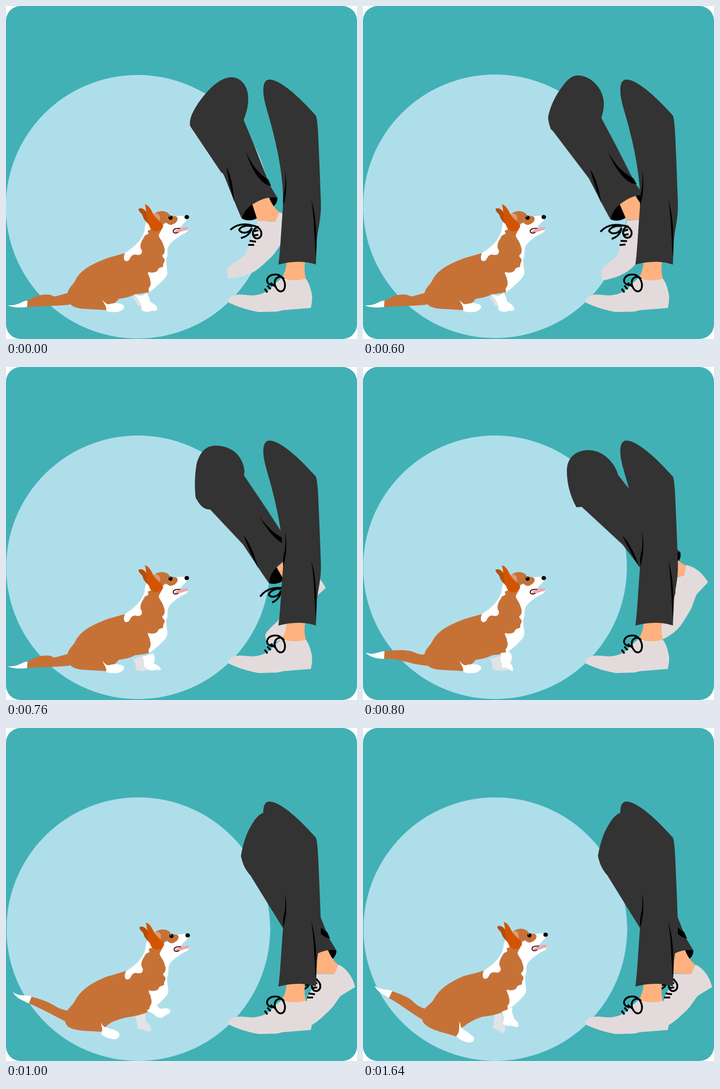
Write an HTML page that moves like this. It is 768 px wide and 729 px high and loops after 2 s.

```html
<!DOCTYPE html>
<html lang="en">
<head>
<meta charset="utf-8">
<title>Dog and walker</title>
<style>
html, body { margin: 0; width: 100%; height: 100%; overflow: hidden; background: #fff; }
svg { display: block; width: 768px; height: 729px; }
.brown { fill: #c67237; }
.white { fill: #fff; }
.grey { fill: #e3e3e5; }
.pants { fill: #333; }
.skin { fill: #ffb27f; }
.shoe { fill: #e3dbdb; }
.lace { fill: none; stroke: #000; stroke-width: 4; }

/* every pose is held, then cut to the next */
.disc, .shin, .thigh, .tail, .tip, .torso, .front, .far, .near, .hind {
  animation: 2s step-end infinite;
}
.disc { animation-name: disc; }
.shin { animation-name: shin; transform-origin: 594px 420px; }
.thigh { animation-name: thigh; }
.tail { animation-name: tail; }
.tip { animation-name: tip; }
.torso { animation-name: torso; }
.front { animation-name: front; }
.far { animation-name: far; }
.near { animation-name: near; }
.hind { animation-name: hind; }

@keyframes disc {
  0% { transform: translate(0, 0); }
  30% { transform: translate(.8px, -1px); }
  45%, 100% { transform: translate(1.5px, .8px); }
}
@keyframes shin {
  0% { transform: translate(0, 0) rotate(0deg); }
  30% { transform: translate(21.2px, -5.3px) rotate(-5.5deg); }
  35% { transform: translate(49.2px, -6.6px) rotate(-11.5deg); }
  40% { transform: translate(100px, -15px) rotate(-15.5deg); }
  45% { transform: translate(112px, 43px) rotate(-6.5deg); }
  50%, 100% { transform: translate(129px, 67px) rotate(0deg); }
}
@keyframes thigh {
  0% { d: path("M403 263C400 248 408 232 421 212C441 184 467 156 494 156C518 157 530 180 530 203C530 220 526 233 521 247L472 366Z"); }
  30% { d: path("M411 270C408 261 405 252 405 243C410 217 423 193 437 175C449 159 458 152 471 152C502 153 527 184 527 214C527 227 524 237 521 247L470 300Z"); }
  35% { d: path("M415 286C412 264 413 236 417 212C424 186 438 172 459 172C494 173 518 193 522 229L510 300L444 312C432 311 424 303 415 286Z"); }
  40% { d: path("M467 307C454 284 446 256 446 227C446 199 465 182 494 182C525 183 549 207 558 235L560 300Z"); }
  45% { d: path("M476 295C474 268 477 238 485 217C494 195 504 185 521 184C538 184 552 190 565 200L620 300L500 327C490 320 482 307 476 295Z"); }
  50%, 100% { d: path("M514 280C519 252 526 230 538 211C546 197 554 189 564 185L640 250L600 330L537 325C525 313 518 299 514 280Z"); }
}
@keyframes tail {
  0% { d: path("M136 628C123 631 114 635 104 636C98 630 83 632 74 633C62 636 54 642 46 646L45 659C75 657 108 657 138 654L160 640Z"); }
  40% { d: path("M137 629C121 632 112 622 98 621C80 618 62 621 46 622L46 639C78 637 103 651 140 654L160 640Z"); }
  45% { d: path("M136 625C125 623 114 615 105 609C88 600 70 597 55 591L49 606C78 618 108 630 138 648L160 630Z"); }
  50% { d: path("M135 619C125 617 116 614 108 609C92 599 72 592 55 588L49 602C78 615 106 630 131 643L155 630Z"); }
  55%, 100% { d: path("M136 615C126 611 119 608 113 602C100 588 82 583 63 576L56 591C83 605 106 625 131 639L155 630Z"); }
}
@keyframes tip {
  0% { d: path("M47 645C34 645 29 657 4 655C12 660 30 661 46 659Z"); }
  40% { d: path("M47 622C33 623 25 632 5 625C15 635 30 639 46 639Z"); }
  45% { d: path("M56 591C42 587 31 595 15 583C22 595 35 600 49 607Z"); }
  50% { d: path("M56 588C42 583 31 589 15 578C21 591 36 596 50 603Z"); }
  55%, 100% { d: path("M64 576C51 570 40 575 25 564C31 578 44 582 57 591Z"); }
}
@keyframes torso {
  0% { d: path("M300 510C290 528 275 536 260 541C240 547 225 550 214 555C183 567 162 580 152 600C148 609 139 615 136 624C131 636 134 652 150 659C165 665 190 663 219 666L228 653C240 651 242 646 247 641C260 639 272 637 282 631C295 630 305 628 314 626L320 612L344 572L340 520Z"); }
  45% { d: path("M302 506C292 524 276 532 262 537C240 544 227 546 216 550C183 562 164 576 152 598C147 608 138 614 135 624C132 636 138 653 152 659C165 664 190 663 218 664L228 652C238 648 240 642 246 638C262 634 285 632 300 626L316 620L322 606L346 568L342 516Z"); }
  50% { d: path("M302 502C292 520 276 528 262 532C240 539 227 542 216 546C183 560 164 574 151 597C146 607 137 612 133 621C127 634 127 646 136 654C150 664 180 663 208 665L218 655C225 645 240 640 254 636C270 632 290 630 305 624L318 617L324 602L346 564L342 512Z"); }
  55%, 100% { d: path("M304 500C294 519 278 526 264 531C244 538 229 540 218 544C188 557 168 571 156 592C150 604 138 609 133 617C128 630 127 641 135 648C148 662 180 667 206 676L214 658C225 650 240 638 262 632C280 630 295 627 308 620L320 614L326 600L348 562L344 510Z"); }
}
@keyframes front {
  0% { transform: translate(0, 0); }
  45% { transform: translate(1.8px, -4px); }
  50% { transform: translate(2px, -8px); }
  55%, 100% { transform: translate(4px, -9.5px); }
}
@keyframes far {
  0% { d: path("M277 638L285 632L297 656L289 657C287 650 283 644 277 638Z"); }
  35% { d: path("M277 640L302 631L304 655L312 662C304 667 291 666 285 662C282 658 287 651 277 640Z"); }
  40% { d: path("M278 639L301 632L302 655L319 661C316 666 298 665 287 663C280 660 287 651 278 639Z"); }
  45% { d: path("M281 632L302 627C303 636 303 644 306 647C314 647 321 654 321 660C315 664 302 660 298 662C290 662 287 658 289 654C288 646 285 640 281 632Z"); }
  50% { d: path("M283 630L304 624C306 632 306 638 307 644C314 647 318 655 318 662C312 667 306 663 298 660C290 660 286 657 288 652C286 644 285 638 283 630Z"); }
  55%, 100% { d: path("M287 628L303 625C307 633 305 642 309 648C312 655 312 662 308 668C302 668 299 661 291 659C284 658 281 655 285 651C287 644 288 638 287 628Z"); }
}
@keyframes near {
  0% { d: path("M281 631C293 636 301 635 308 627L314 640C312 649 326 651 330 659C333 666 328 669 319 667C312 671 299 670 296 664C298 652 289 641 281 631Z"); }
  35% { d: path("M299 634L322 627C326 634 327 641 323 648C328 653 338 654 339 663C334 665 329 661 325 664C317 665 310 664 305 658C300 654 303 643 299 634Z"); }
  40% { d: path("M301 626L321 624C327 631 327 639 322 648C326 652 329 657 328 665C321 666 318 659 313 658C307 660 301 657 304 651C299 643 303 635 301 626Z"); }
  45% { d: path("M313 622L330 605C334 614 339 622 346 624C354 627 356 631 354 637C347 638 343 636 339 640C332 643 325 640 320 634Z"); }
  50% { d: path("M308 619L329 602C331 610 334 614 341 615C350 612 358 614 360 620C357 628 348 627 344 633C338 636 331 634 326 629C321 623 314 622 308 619Z"); }
  55%, 100% { d: path("M304 621L327 612C324 624 329 629 332 638C340 644 342 650 339 655C332 655 326 651 321 652C315 652 307 651 306 645C310 636 307 629 304 621Z"); }
}
@keyframes hind {
  0% { d: path("M211 643C216 650 222 655 228 652C240 650 253 650 258 656C260 664 250 670 240 670C228 671 221 669 219 666C221 658 214 652 211 643Z"); }
  50% { d: path("M208 645C213 657 222 655 230 659C240 661 250 666 248 674C243 684 232 682 222 678C213 674 207 672 209 666C213 660 208 653 208 645Z"); }
  55%, 100% { d: path("M211 643C214 648 213 655 217 658C225 664 233 667 242 677C246 686 238 690 228 688C216 685 207 679 204 674C212 668 210 655 211 643Z"); }
}
</style>
</head>
<body>
<svg viewBox="0 0 768 729">
  <rect width="768" height="729" rx="32" fill="#41b1b6"/>
  <circle class="disc" cx="288" cy="439.5" r="288.5" fill="#afdeeb"/>

  <g id="dog">
    <path class="tail brown"/>
    <path class="tip white"/>
    <path class="far grey"/>
    <path class="torso brown"/>
    <path class="hind white"/>
    <path class="near white"/>
    <g class="front">
      <path class="brown" d="M312 478C308 500 300 510 290 530L300 570L330 584L346 570L350 540L338 505L344 482Z"/>
      <path class="white" d="M310 468C306 475 304 480 303 492C296 515 280 528 260 541C255 555 260 560 266 558C273 556 270 546 282 544C292 547 299 544 297 534C291 526 296 518 300 506C304 500 306 503 312 498L310 492L317 489L318 475Z"/>
      <path class="white" d="M374 460L391 459C399 461 398 467 392 473C386 477 384 482 380 485L374 488L384 492L399 488C399 493 394 497 386 500C374 507 359 518 356 526C352 532 354 540 353 548C349 553 351 560 351 567C352 575 355 585 351 591C345 600 335 610 313 627L312 618C318 612 317 604 315 599C316 593 309 589 311 582C320 586 329 582 331 580C335 570 340 574 344 570C343 562 348 561 347 555C346 551 341 550 342 546C350 540 347 530 345 524C342 514 336 510 334 502C337 494 342 490 343 480L360 470Z"/>
      <path fill="#b34f0c" d="M290 444C298 440 304 446 309 454L314 480C307 472 301 468 299 459C297 453 290 451 290 444Z"/>
      <path class="brown" d="M318 472C317 457 328 449 343 449C352 450 357 454 358 458C364 460 372 459 375 463C377 469 373 474 367 477C361 481 355 479 351 474C344 475 341 479 343 486L320 490Z"/>
      <path fill="#d99b75" d="M322 456C327 452 333 454 336 459C338 463 336 469 337 474L330 468Z"/>
      <path fill="#d35400" d="M304 434C313 436 318 447 323 457C331 468 341 474 344 481C343 488 336 494 328 493C321 493 315 487 314 482C307 470 308 449 304 434Z"/>
      <circle cx="360" cy="463.5" r="4.5"/>
      <circle class="white" cx="358.5" cy="461" r="1"/>
      <ellipse cx="395.5" cy="462" rx="5" ry="4.5"/>
      <path fill="#eba9ab" d="M369 494C374 487 386 485 397 484C400 487 399 490 395 491C388 491 380 497 370 497Z"/>
      <path fill="none" stroke="#4d0f12" stroke-width="2.2" d="M381 487C373 486 365 488 366 494C367 498 374 498 377 495"/>
    </g>
  </g>

  <g id="back-leg">
    <g class="shin">
      <path class="shoe" d="M550 471L589 472C592 466 595 458 598 451C612 456 629 475 635 500L604 519C596 527 590 541 579 551C568 561 556 574 542 582C530 588 518 592 505 594C495 596 488 597 485 595C484 588 484 582 485 575C490 566 502 560 515 552C528 544 528 530 534 515C545 500 548 485 550 471Z"/>
      <path d="M516 465C525 471 538 470 547 466L587 437C592 432 594 426 594 420L570 405L520 440Z"/>
      <path class="skin" d="M539 434L545 415L573 410L576 420C580 432 590 445 598 452L589 472L550 470C548 460 542 445 539 434Z"/>
      <path class="pants" d="M406 250C406 254 406 257 409 261L477 371C489 400 502 435 516 466C520 449 530 439 545 431C562 421 577 417 594 420L577 392L545 310L519 247L507 218Z"/>
      <path d="M482 352C493 372 497 398 499 428C493 408 486 377 482 352Z"/>
      <path d="M525 319C538 347 552 367 574 380L580 394C561 392 539 365 525 319Z"/>
      <path class="lace" d="M491 490C506 476 524 476 541 481C555 483 561 494 558 503C554 511 544 511 541 502C538 494 543 486 553 483M539 483C528 478 513 483 510 490C515 499 531 499 538 486C535 497 527 505 514 508"/>
      <path class="lace" d="M543 493L552 491M542 502L552 501M533 514L547 516M530 523L543 523"/>
    </g>
    <path class="thigh pants"/>
  </g>

  <g id="front-leg">
    <path class="skin" d="M614 555L655 555C652 575 653 585 657 600L630 606L602 597C610 585 614 572 614 555Z"/>
    <path class="shoe" d="M487 649C485 640 494 632 508 632C521 631 533 635 545 633C570 630 580 618 592 605L604 595C620 602 640 602 656 597C663 605 667 620 669 630C671 640 669 652 667 661L605 666C598 668 595 669 591 669L553 670C530 666 505 658 487 649Z"/>
    <path class="pants" d="M563 185C563 168 568 161 577 161C603 162 648 206 678 240C681 247 682 265 683 280L686 350L689 430C690 470 681 490 680 520L678 566C655 558 625 558 596 566C600 540 602 490 606 440C609 380 593 305 576 245C568 218 563 200 563 185Z"/>
    <path d="M611 361C615 388 614 410 607 437C605 420 608 410 610 400C612 388 611 375 611 361Z"/>
    <path d="M668 425C678 455 681 500 678 550C674 505 675 465 668 425Z"/>
    <path class="lace" d="M588 611C575 612 569 605 572 597C576 588 588 586 597 589C607 594 612 606 610 616C608 626 599 627 594 621C586 612 586 600 593 595C599 591 606 593 608 598"/>
    <path class="lace" d="M579 606L589 614M572 612L579 620M566 619L572 627"/>
  </g>
</svg>
</body>
</html>
```
